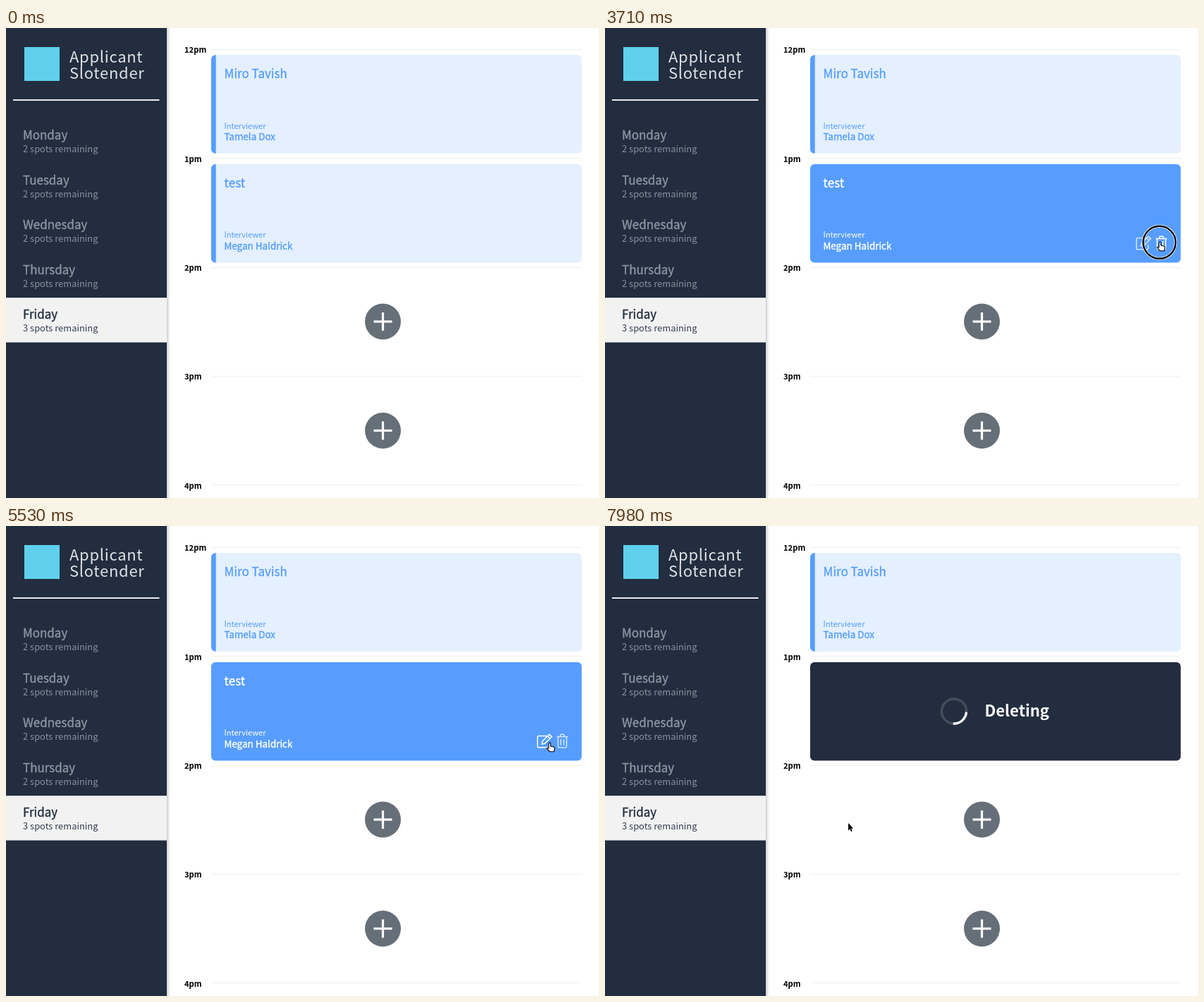
Write an HTML page with a canvas that moves like this. It is 841x666 px and loops after 8000 ms.

```html
<!DOCTYPE html>
<html lang="en">
<head>
<meta charset="utf-8">
<title>Booking day view</title>
<style>
  html, body { margin: 0; width: 100%; height: 100%; overflow: hidden; background: #fff; }
  canvas { display: block; width: 841px; height: 666px; }
</style>
</head>
<body>
<canvas id="stage" width="841" height="666"></canvas>
<script>
const ctx = document.getElementById('stage').getContext('2d');
const FONT = '"Noto Sans CJK JP", "Noto Sans CJK SC", "Noto Sans CJK", "Open Sans", sans-serif';
const LOOP = 8000, STEP = 70, ROW = 154.3;
const NAVY = '#222d3f', BLUE = '#569dff', PALE = '#e4f0ff', RED = '#e05153';
const CARD = { x: 291, w: 525.5, h: 139.5 };
const CARD_Y = 193;
const BUTTONS = [{ label: 'Cancel', x: 446 }, { label: 'Confirm', x: 560 }];
const BUTTON = { y: 290.3, w: 101.5, h: 25.2 };

// Pointer path: [time, x, y]
const PATH = [
  [770, 341, 613], [980, 283, 489], [1190, 283, 489], [1400, 322, 453], [1470, 322, 453],
  [2100, 346, 313], [2310, 444, 267], [2520, 580, 278], [2730, 580, 278], [3570, 787, 303],
  [3990, 787, 303], [4340, 572, 302], [4550, 497, 302], [5110, 497, 302], [5530, 771, 307],
  [5670, 787, 304], [5950, 787, 304], [6160, 791, 308], [6510, 686, 306], [6790, 622, 304],
  [7210, 622, 304], [7840, 352, 394], [7980, 345, 421]
];
const CLICKS = [3640, 4900, 5740, 7070];
const CLICK_TIME = 210;
const [ASK, CANCELLED, ASK_AGAIN, DELETING] = CLICKS.map(t => t + CLICK_TIME);

const ARROW = new Path2D('M0 0V10.4L2.4 8.2L4 12L5.8 11.2L4.2 7.5H7.3Z');
const HAND = new Path2D('M-1.3 1Q0 -.8 1.3 1V5L5.5 6Q7.4 6.5 7 9L6 12.8H0L-4 8.2Q-3.4 6.5 -1.3 8Z');
const BEAM = new Path2D('M-3 -6.5Q0 -6.5 0 -4.5Q0 -6.5 3 -6.5M0 -4.5V4.5M-3 6.5Q0 6.5 0 4.5Q0 6.5 3 6.5M-1.5 2.5H1.5');
const EDIT = new Path2D('M767 297.5H755.5Q753.7 297.5 753.7 299.3V312Q753.7 313.8 755.5 313.8H768.5Q770.3 313.8 770.3 312V307' +
  'M760 309L760.8 304.8L770.6 295.3L774 298.6L764.2 308.2ZM768.2 297.7L771.6 301');
const TRASH = new Path2D('M781 298.5H797M785.7 298L787 295.3H791L792.3 298' +
  'M783 299V312Q783 314 785 314H793Q795 314 795 312V299M786.8 302V310.5M791.2 302V310.5');

// A hairline outline turns the regular face into a medium one.
function text(str, x, y, size, color, weight = 400, align = 'left') {
  ctx.font = `${weight} ${size}px ${FONT}`;
  ctx.fillStyle = color;
  ctx.textAlign = align;
  ctx.fillText(str, x, y);
  if (weight === 500) {
    ctx.strokeStyle = color;
    ctx.lineWidth = .35;
    ctx.strokeText(str, x, y);
  }
}

function rect(x, y, w, h, color) {
  ctx.fillStyle = color;
  ctx.fillRect(x, y, w, h);
}

function roundRect(x, y, w, h, r) {
  ctx.beginPath();
  ctx.roundRect(x, y, w, h, r);
}

function stroke(color, width, path) {
  ctx.strokeStyle = color;
  ctx.lineWidth = width;
  path ? ctx.stroke(path) : ctx.stroke();
}

function fillCard(y, color) {
  roundRect(CARD.x, y, CARD.w, CARD.h, 6);
  ctx.fillStyle = color;
  ctx.fill();
}

function arc(x, y, r, from = 0, to = Math.PI * 2) {
  ctx.beginPath();
  ctx.arc(x, y, r, from, to);
}

function drawSidebar() {
  ctx.save();
  ctx.shadowColor = 'rgba(0,0,0,.3)';
  ctx.shadowBlur = 5;
  ctx.shadowOffsetX = 1;
  rect(0, -10, 228, 690, NAVY);
  ctx.restore();

  rect(26, 27, 50, 48, '#5fd0ec');
  ctx.letterSpacing = '0.7px';
  text('Applicant', 90, 48.5, 22, '#dfe2e6', 300);
  text('Slotender', 90, 71.5, 22, '#dfe2e6', 300);
  ctx.letterSpacing = '0px';
  rect(10, 101.2, 207.5, 1.8, '#fff');

  ['Monday', 'Tuesday', 'Wednesday', 'Thursday', 'Friday'].forEach((day, i) => {
    const y = 128 + i * 63.5, selected = i === 4;
    if (selected) rect(0, y + .2, 228, 63.3, '#f2f2f2');
    text(day, 24, y + 30, 16.95, selected ? NAVY : '#8c96a4', 500);
    text(`${selected ? 3 : 2} spots remaining`, 24.1, y + 48.3, 12.87, selected ? '#353f50' : '#8791a0', 300);
  });
}

function drawSchedule() {
  ['12pm', '1pm', '2pm', '3pm', '4pm'].forEach((hour, i) => {
    const y = 30 + i * ROW;
    text(hour, 253, y + 5.3, 11.2, '#000', 700);
    rect(CARD.x, Math.round(y), CARD.w, 1, '#eeeeee');
  });
  for (const y of [416, 570.5]) {
    arc(534.5, y, 25.5);
    ctx.fillStyle = '#666e77';
    ctx.fill();
    rect(521.5, y - 1.6, 26, 3.2, '#fff');
    rect(532.9, y - 13, 3.2, 26, '#fff');
  }
}

function drawBooking(y, student, interviewer, hovered) {
  fillCard(y, hovered ? BLUE : PALE);
  if (!hovered) {
    roundRect(CARD.x, y, 6.7, CARD.h, [6, 0, 0, 6]);
    ctx.fillStyle = BLUE;
    ctx.fill();
  }
  const color = hovered ? '#fff' : BLUE;
  text(student, 309.6, y + 33, 17, color, 500);
  text('Interviewer', 309.4, y + 104.2, 11.1, color, 300);
  text(interviewer, 309.4, y + 120.5, 13.45, color, 500);
}

function drawActions(target) {
  stroke(target === 'edit' ? '#fff' : '#d3e5ff', 1.5, EDIT);
  stroke(target === 'trash' ? '#fff' : '#d3e5ff', 1.5, TRASH);
}

function drawQuestion(target) {
  fillCard(CARD_Y, '#fde4e4');
  roundRect(CARD.x + .8, CARD_Y + .8, CARD.w - 1.6, CARD.h - 1.6, 5.5);
  stroke(RED, 1.6);
  text('Are you sure you would like to delete?', 553.5, 231.7, 22.1, RED, 600, 'center');
  for (const { label, x } of BUTTONS) {
    const active = target === label;
    roundRect(x + .8, BUTTON.y + .8, BUTTON.w - 1.6, BUTTON.h - 1.6, 12);
    if (active) {
      ctx.fillStyle = '#f05455';
      ctx.fill();
    }
    stroke(active ? '#f05455' : RED, 1.6);
    text(label, x + BUTTON.w / 2, 309, 16.95, active ? '#fff' : RED, 500, 'center');
  }
}

function drawDeleting(elapsed) {
  fillCard(CARD_Y, NAVY);
  arc(495, 262.5, 17.5);
  stroke('#434d5c', 3.5);
  const start = Math.PI * (0.75 + 2 * elapsed / 1100);
  arc(495, 262.5, 17.5, start, start + Math.PI / 2);
  stroke('#f4f5f6', 3.5);
  text('Deleting', 538.5, 270, 22.1, '#fff', 600);
}

function pointerAt(t) {
  if (t < PATH[0][0]) return null;
  const next = PATH.findIndex(key => key[0] > t);
  if (next < 0) return { x: PATH.at(-1)[1], y: PATH.at(-1)[2] };
  const [t0, x0, y0] = PATH[next - 1], [t1, x1, y1] = PATH[next];
  const p = (t - t0) / (t1 - t0);
  return { x: x0 + (x1 - x0) * p, y: y0 + (y1 - y0) * p };
}

function inside(p, x, y, w, h) {
  return !!p && p.x >= x && p.x <= x + w && p.y >= y && p.y <= y + h;
}

function modeAt(t) {
  if (t >= DELETING) return 'deleting';
  return (t >= ASK && t < CANCELLED) || t >= ASK_AGAIN ? 'question' : 'booking';
}

function targetAt(p, mode) {
  if (mode === 'question') {
    return BUTTONS.find(b => inside(p, b.x, BUTTON.y, BUTTON.w, BUTTON.h))?.label;
  }
  if (mode === 'booking') {
    if (inside(p, 753, 294, 24, 22)) return 'edit';
    if (inside(p, 779, 294, 20, 22)) return 'trash';
  }
}

function drawPointer(p, kind, clicking) {
  ctx.save();
  ctx.translate(p.x, p.y);
  ctx.lineJoin = 'round';
  if (clicking) {
    arc(-.7, .8, 23);
    stroke('#fff', 4);
    stroke('#000', 2.4);
  }
  if (kind === 'beam') {
    stroke('#fff', 2.6, BEAM);
    stroke('#000', 1.1, BEAM);
  } else if (kind === 'hand') {
    ctx.fillStyle = '#fff';
    ctx.fill(HAND);
    stroke('#000', 1.1, HAND);
  } else {
    stroke('#fff', 1.6, ARROW);
    ctx.fillStyle = '#000';
    ctx.fill(ARROW);
  }
  ctx.restore();
}

function draw(t) {
  const mode = modeAt(t), pointer = pointerAt(t), target = targetAt(pointer, mode);
  const hovered = inside(pointer, CARD.x, CARD_Y, CARD.w, CARD.h);

  rect(0, 0, 841, 666, '#fff');
  drawSidebar();
  drawSchedule();
  drawBooking(38.3, 'Miro Tavish', 'Tamela Dox', false);

  if (mode === 'deleting') {
    drawDeleting(t - DELETING);
  } else if (mode === 'question') {
    drawQuestion(target);
  } else {
    drawBooking(CARD_Y, 'test', 'Megan Haldrick', hovered);
    if (hovered) drawActions(target);
  }

  if (pointer) {
    const overText = mode === 'booking' && inside(pointer, 309, 286, 100, 32);
    const clicking = CLICKS.some(c => t >= c && t < c + CLICK_TIME);
    drawPointer(pointer, target ? 'hand' : overText ? 'beam' : 'arrow', clicking);
  }
}

const began = performance.now();
function frame() {
  const t = (performance.now() - began) % LOOP;
  draw(Math.floor(t / STEP) * STEP);
  requestAnimationFrame(frame);
}
frame();
</script>
</body>
</html>
```
